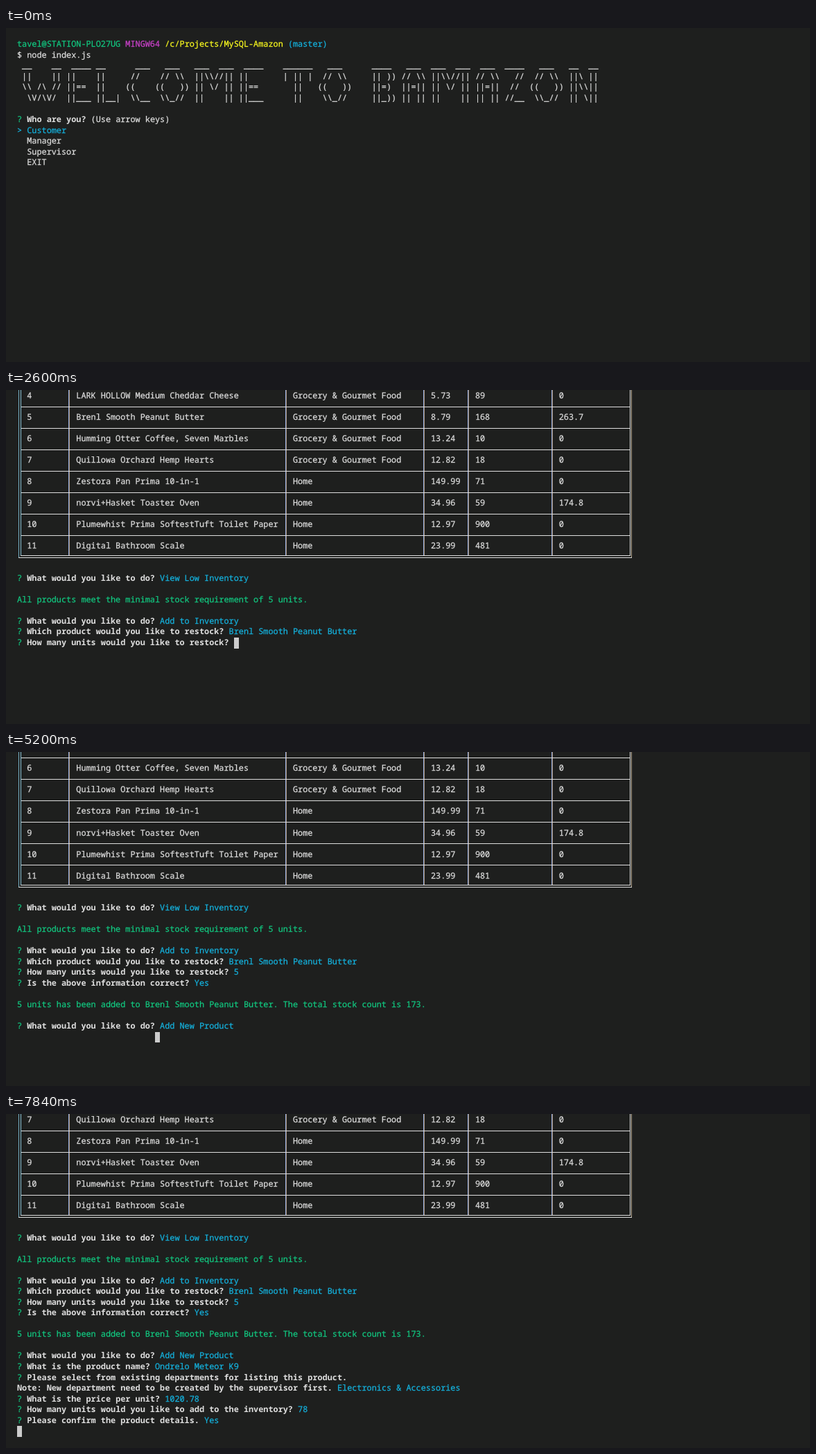
An HTML page for the animation above (8 s loop, 1160 by 483 pixels).

```html
<!DOCTYPE html>
<html lang="en">
<head>
<meta charset="utf-8">
<title>Store terminal</title>
<style>
  html, body { margin: 0; width: 100%; height: 100%; overflow: hidden; background: #1e1f1e; }
  #screen {
    position: relative; width: 1160px; height: 483px; overflow: hidden;
    font: 11.85px/15.53px "Noto Sans Mono", "DejaVu Sans Mono", monospace;
    color: #dedede; text-rendering: geometricPrecision; font-variant-ligatures: none;
    -webkit-text-stroke: 0.25px;
  }
  #screen div { position: absolute; }
  .row { left: 16px; height: 15.53px; white-space: pre; }
  b { -webkit-text-stroke: 0; }
  .green { color: #12c880; }
  .cyan { color: #14b2de; }
  .blue { color: #3b98fa; }
  .pink { color: #cc42cc; }
  .yellow { color: #fafa1e; }
  i { display: inline-block; width: 7.11px; height: 15.53px; vertical-align: top; background: #ccc; }
</style>
</head>
<body>
<div id="screen"></div>
<script>
const LOOP = 8000, ROWS = 31, CH = 7.11, LH = 15.53;
const stage = document.getElementById('screen');

const BANNER = String.raw`
 __    __  ____ __      ___   ___   ___  ___  ____    ______   ___      ____   ___  ___  ___  ___  ____   ___   __  __
 ||    || ||    ||     //    // \\  ||\\//|| ||       | || |  // \\     || )) // \\ ||\\//|| // \\   //  // \\  ||\ ||
 \\ /\ // ||==  ||    ((    ((   )) || \/ || ||==       ||   ((   ))    ||=)  ||=|| || \/ || ||=||  //  ((   )) ||\\||
  \V/\V/  ||___ ||__|  \\__  \\_//  ||    || ||___      ||    \\_//     ||_)) || || ||    || || || //__  \\_//  || \||`;

const DEPTS = ['Electronics & Accessories', 'Grocery & Gourmet Food', 'Home'];
const PRODUCTS = [
  ['Velmora Prima 128GB microSD', 0, 19, 8],
  ['Tolvi HushDrops Slim Bluetooth Earbuds', 0, 32.99, 50],
  ['Pulvex Strive 3 fitness activity tracker', 0, 199.95, 156],
  ['LARK HOLLOW Medium Cheddar Cheese', 1, 5.73, 89],
  ['Brenl Smooth Peanut Butter', 1, 8.79, 168, 263.7],
  ['Humming Otter Coffee, Seven Marbles', 1, 13.24, 10],
  ['Quillowa Orchard Hemp Hearts', 1, 12.82, 18],
  ['Zestora Pan Prima 10-in-1', 2, 149.99, 71],
  ['norvi+Hasket Toaster Oven', 2, 34.96, 59, 174.8],
  ['Plumewhist Prima SoftestTuft Toilet Paper', 2, 12.97, 900],
  ['Digital Bathroom Scale', 2, 23.99, 481],
];
const NAMES = PRODUCTS.map(p => p[0]);
const MENU = ['View Products for Sale', 'View Low Inventory', 'Add to Inventory', 'Add New Product', 'Exit'];
const YES_NO = ['Yes', 'No'];
const CURSOR = '<i></i>';

const paint = (color, text) => `<span class="${color}">${text}</span>`;
const ask = q => `${paint('green', '?')} <b>${q.replace('\n', '</b>\n<b>')}</b> `;
const answer = (q, a) => (ask(q) + paint('cyan', a)).split('\n');
const choices = (opts, pick) => opts.map((o, k) => k === pick ? paint('cyan', '> ' + o) : '  ' + o);
const list = (q, opts, pick, hint) =>
  [...(ask(q) + (hint ? '(Use arrow keys)' : '')).split('\n'), ...choices(opts, pick)];
const note = text => ['', paint('green', text), ''];

// Long lists show seven entries and scroll once the pointer reaches the middle.
function pagedList(q, opts, pick) {
  const start = Math.max(0, pick - 3);
  return [...list(q, opts.slice(start, start + 7), pick - start, !pick),
    '(Move up and down to reveal more choices)'];
}

function tableRow(cells) {
  const stops = [2, 12, 56, 84, 93, 110];
  return cells.reduce((line, cell, k) => line.padEnd(stops[k]) + cell, '');
}

const bar = (x, y, w, h, color) =>
  `<div style="left:${x}px;top:${y}px;width:${w}px;height:${h}px;background:${color}"></div>`;

// Upright rules carry the blue and tan fringes of subpixel rendering.
const upright = (x, y, h) => bar(x, y, 1, h, '#90a8dc') + bar(x + 1, y, 1, h, '#a8927a');

function tableLines(first, last) {
  const mid = r => Math.floor(8.6 + LH * r);
  const top = mid(first), end = mid(last);
  let html = [10, 54, 82, 91, 108].map(c =>
    upright(Math.floor(16 + CH * (c + 0.5)), top, end - 2 - top)).join('');
  for (let r = first + 2; r < last; r += 2) html += bar(21, mid(r), 880, 1, '#dedede');
  html += bar(18, top, 1, end + 2 - top, '#78b4c8') + bar(21, top, 1, end - 1 - top, '#8cc4d8');
  html += bar(900, top, 1, end - 1 - top, '#dedede') + bar(902, top, 1, end + 2 - top, '#b8a890');
  return html + bar(21, end - 2, 880, 1, '#dedede') + bar(18, end + 1, 885, 1, '#dedede');
}

const log = [], steps = [];
let scroll = 0, table = null;

function show(time, ...live) {
  const lines = [...log, ...live];
  scroll = Math.max(scroll, lines.length - ROWS);
  const rows = lines.slice(scroll).map((text, r) =>
    text && `<div class="row" style="top:${(0.8 + LH * r).toFixed(2)}px">${text}</div>`);
  const grid = table ? tableLines(table.first - scroll, table.last - scroll) : '';
  steps.push({ time, html: grid + rows.join('') });
}

function type(time, q, entries, pace = 60) {
  entries.forEach((text, k) => show(time + k * pace, ask(q) + text + CURSOR));
}
const prefixes = (text, from = 0) =>
  Array.from({ length: text.length + 1 - from }, (_, k) => text.slice(0, from + k));

function addTable() {
  const head = ['item_id', 'product_name', 'department_name', 'price', 'stock_quantity', 'product_sales'];
  const first = log.length;
  log.push('', paint('blue', tableRow(head)), '');
  PRODUCTS.forEach(([name, dept, price, stock, sales = 0], k) =>
    log.push(tableRow([k + 1, name, DEPTS[dept], price, stock, sales]), ''));
  table = { first, last: log.length - 1 };
  log.push('');
}

const WHO = 'Who are you?', TODO = 'What would you like to do?';
const ROLES = ['Customer', 'Manager', 'Supervisor', 'EXIT'];

// Sign in and show the stock
log.push('',
  `${paint('green', 'tavel@STATION-PLO27UG')} ${paint('pink', 'MINGW64')} ` +
  `${paint('yellow', '/c/Projects/MySQL-Amazon')} ${paint('cyan', '(master)')}`,
  '$ node index.js', ...BANNER.split('\n').slice(1), '');
show(0, ...list(WHO, ROLES, 0, true));
show(200, ...list(WHO, ROLES, 1));
log.push(...answer(WHO, 'Manager'));
show(400, ...list(TODO, MENU, 0, true));
log.push(...answer(TODO, MENU[0]), '');
addTable();
show(600, ...list(TODO, MENU, 0, true));
show(800, ...list(TODO, MENU, 1));

// Low inventory
log.push(...answer(TODO, MENU[1]), ...note('All products meet the minimal stock requirement of 5 units.'));
[1000, 1200, 1400].forEach((t, k) => show(t, ...list(TODO, MENU, k, !k)));

// Restock
const WHICH = 'Which product would you like to restock?';
const RESTOCK = 'How many units would you like to restock?';
const CORRECT = 'Is the above information correct?';
log.push(...answer(TODO, MENU[2]));
for (let k = 0; k < 5; k++) show(1600 + 200 * k, ...pagedList(WHICH, NAMES, k));
log.push(...answer(WHICH, NAMES[4]));
type(2600, RESTOCK, ['', '5'], 200);
log.push(...answer(RESTOCK, '5'));
show(3000, ...list(CORRECT, YES_NO, 0, true));
log.push(...answer(CORRECT, 'Yes'));
show(3200, CURSOR);
log.push(...note(`5 units has been added to ${NAMES[4]}. The total stock count is 173.`));
[0, 1, 2, 3, 4, -1, 4, 3].forEach((pick, k) =>
  show(3400 + 200 * k, ...(pick < 0 ? [] : list(TODO, MENU, pick, !k))));

// New product
const NAME = 'What is the product name?', NEW_NAME = 'Ondrelo Meteor K9';
const DEPT = 'Please select from existing departments for listing this product.\n' +
  'Note: New department need to be created by the supervisor first.';
const PRICE = 'What is the price per unit?';
const UNITS = 'How many units would you like to add to the inventory?';
const CONFIRM = 'Please confirm the product details.';
log.push(...answer(TODO, MENU[3]));
show(5000);
show(5200, ' '.repeat(28) + CURSOR);
type(5260, NAME, prefixes(NEW_NAME));
log.push(...answer(NAME, NEW_NAME));
show(6340, ...list(DEPT, DEPTS, 0, true));
log.push(...answer(DEPT, DEPTS[0]));
type(6540, PRICE, [...prefixes('10207'), ...prefixes('1020.78', 4)]);
log.push(...answer(PRICE, '1020.78'));
type(7140, UNITS, prefixes('78'));
log.push(...answer(UNITS, '78'));
show(7320, CURSOR);
show(7380, ...list(CONFIRM, YES_NO, 0, true));
show(7580, ...list(CONFIRM, YES_NO, 1));
show(7780, ...list(CONFIRM, YES_NO, 0));
log.push(...answer(CONFIRM, 'Yes'));
show(7840, CURSOR);

const start = performance.now();
let shown = null;
function draw() {
  const now = (performance.now() - start) % LOOP;
  const step = steps.filter(s => s.time <= now).pop();
  if (step !== shown) {
    stage.innerHTML = step.html;
    shown = step;
  }
  requestAnimationFrame(draw);
}
draw();
</script>
</body>
</html>
```
